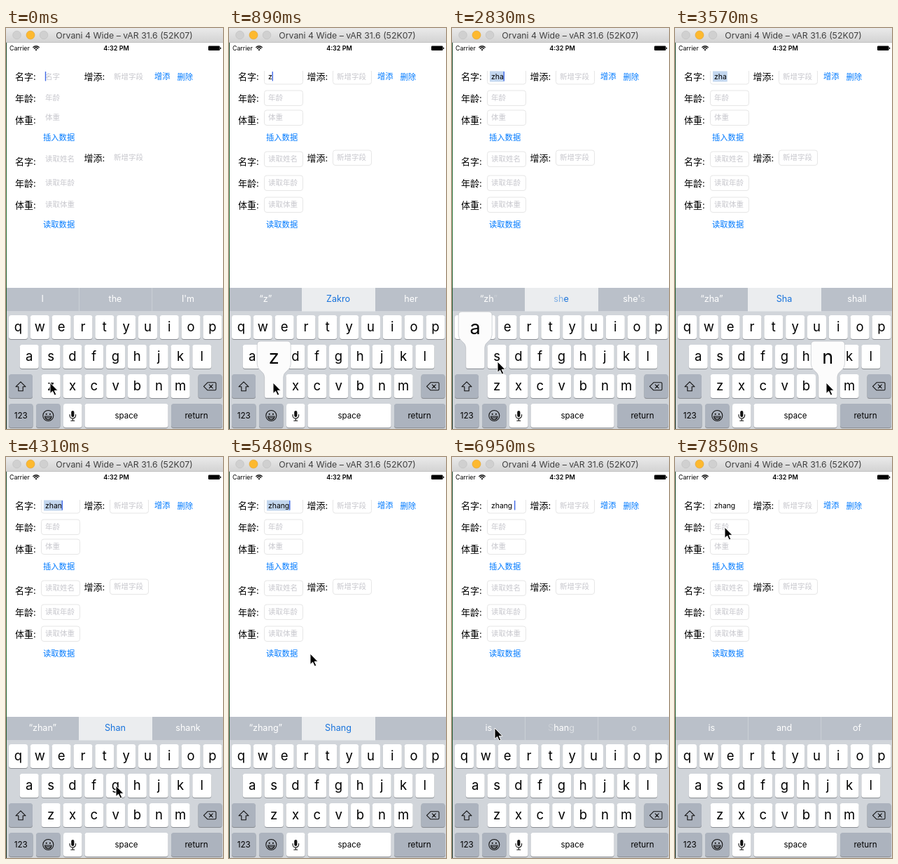
An HTML page for the animation above (7.99 s loop, 310x571 px).

```html
<!DOCTYPE html>
<html lang="zh-CN">
<head>
<meta charset="utf-8">
<title>Form typing demo</title>
<style>
html, body { margin: 0; width: 100%; height: 100%; overflow: hidden; background: #fff; }
svg { display: block; width: 100vw; height: 100vh; }
text { font-family: Inter, "Noto Sans CJK SC", "Noto Sans CJK JP", "Noto Sans CJK", sans-serif; white-space: pre; }
.icon { fill: none; stroke: #111; stroke-width: 1.1; stroke-linejoin: round; stroke-linecap: round; }
</style>
</head>
<body>
<svg id="stage" viewBox="0 0 310 571">
  <defs>
    <linearGradient id="titleBar" x2="0" y2="1"><stop stop-color="#eaeaea"/><stop offset="1" stop-color="#d3d3d3"/></linearGradient>
    <linearGradient id="edge" x2="0" y2="1"><stop stop-color="#1d4a2c"/><stop offset=".45" stop-color="#2f7a3c"/><stop offset="1" stop-color="#16301f"/></linearGradient>
    <clipPath id="belowTop"><rect y="61" width="310" height="300"/></clipPath>
  </defs>
  <g id="fixed"></g>
  <g id="live"></g>
</svg>
<script>
const LOOP = 7990, STEP = 148;
const BLUE = '#007aff', HINT = '#c7c7cd', GREY_KEY = '#acb3be';
const TYPE_SIZE = 10.4;

const rect = (x, y, w, h, fill, r = 0, more = '') =>
  `<rect x="${x}" y="${y}" width="${w}" height="${h}" rx="${r}" fill="${fill}" ${more}/>`;
const text = (s, x, y, size, fill = '#000', more = '') =>
  `<text x="${x}" y="${y}" font-size="${size}" fill="${fill}" ${more}>${s}</text>`;
const circle = (x, y, r, fill, more = '') =>
  `<circle cx="${x}" cy="${y}" r="${r}" fill="${fill}" ${more}/>`;
const icon = (d, more = '') => `<path class="icon" d="${d}" ${more}/>`;
const MID = 'text-anchor="middle"';

// Window and status bar
function drawChrome() {
  return rect(0, 0, 310, 571, '#fff') + rect(0, 20, 1, 551, 'url(#edge)') +
    rect(0, 0, 310, 20.5, 'url(#titleBar)') + rect(0, 20, 310, .8, '#b9b9b9') +
    circle(15.5, 10, 5.8, '#d0d0d0', 'stroke="#bdbdbd" stroke-width=".6"') +
    circle(35, 10, 6, '#fdb92f', 'stroke="#e0a02c" stroke-width=".6"') +
    circle(54, 10, 5.8, '#d0d0d0', 'stroke="#bdbdbd" stroke-width=".6"') +
    text('Orvani 4 Wide – vAR 31.6 (52K07)', 169, 14.8, 12.3, '#404040', MID) +
    text('Carrier', 5, 32, 8.8) +
    icon('M38.8 27.4a6 6 0 0 1 8.4 0M40.4 29.2a3.8 3.8 0 0 1 5.2 0', 'style="stroke-width:1.4"') +
    '<path d="M41.5 30.7a2.2 2.2 0 0 1 3 0L43 32.4z"/>' +
    text('4:32 PM', 157.5, 32, 9, '#000', MID + ' font-weight="600"') +
    rect(289, 25.5, 16.5, 6.5, '#000', 1.2) + rect(306, 27.5, 1.2, 2.6, '#000', .5);
}

const fields = [
  [50, 58, '名字', 69], [50, 88.5, '年龄', 99.5], [50, 116.5, '体重', 127],
  [50, 175.5, '读取姓名', 186.5], [50, 209.5, '读取年龄', 220], [50, 240.5, '读取体重', 251],
  [148, 58, '新增字段', 69], [148, 173.5, '新增字段', 184.5]
];
const hint = ([x, , label, y]) => text(label, x + 6, y + 3.9, 10.5, HINT);

function drawForm() {
  const labels = [['名字:', 13, 69], ['年龄:', 13, 100], ['体重:', 13, 131], ['名字:', 13, 190],
    ['年龄:', 13, 221], ['体重:', 13, 252], ['增添:', 111.5, 69], ['增添:', 111.5, 185]];
  const buttons = [['增添', 212, 69], ['删除', 244.5, 70], ['插入数据', 53, 156], ['读取数据', 53, 280]];
  return labels.map(([s, x, y]) => text(s, x, y + 4.8, 13)).join('') +
    buttons.map(([s, x, y]) => text(s, x, y + 4.2, 11.3, BLUE)).join('') +
    fields.slice(1).map(hint).join('');
}

// Keyboard
const keys = {};
[['qwertyuiop', 17.5, 409], ['asdfghjkl', 33.2, 451], ['zxcvbnm', 64.2, 493]].forEach(([row, x, y]) =>
  [...row].forEach((c, i) => keys[c] = { x: x + i * 30.83, y }));

const keyCap = (x, y, w, fill = '#fff') =>
  rect(x, y + 1, w, 34, '#898c91', 3.5) + rect(x, y, w, 34, fill, 3.5);

function drawKeyboard() {
  const letters = Object.entries(keys).map(([c, k]) =>
    keyCap(k.x - 13.5, k.y, 27) + text(c, k.x, k.y + 22.8, 18.5, '#000', MID)).join('');
  return rect(1, 403.5, 309, 168, '#d1d5da') + letters +
    keyCap(4, 493, 34, GREY_KEY) + keyCap(274.5, 493, 34, GREY_KEY) +
    keyCap(4, 535, 34.5, GREY_KEY) + keyCap(43, 535, 34.5, GREY_KEY) +
    keyCap(82, 535, 26.5) + keyCap(112.5, 535, 119) + keyCap(236, 535, 73, GREY_KEY) +
    text('123', 21.2, 556.3, 11.7, '#000', MID) + text('space', 172, 555.8, 11.5, '#000', MID) +
    text('return', 272, 555.8, 11.7, '#000', MID) +
    icon('M21 503.8l7 7h-3.8v6h-6.4v-6H14z') +
    icon('M288 504.8h10.5a1.5 1.5 0 0 1 1.5 1.5v8a1.5 1.5 0 0 1-1.5 1.5H288l-5.5-5.5zM290.3 507.8l5 5m0-5l-5 5') +
    circle(60.3, 552, 7.5, 'none', 'stroke="#111" stroke-width="1.1"') +
    circle(57.7, 549.8, 1.1, '#111') + circle(62.9, 549.8, 1.1, '#111') +
    icon('M55.5 553h9.6a4.8 4.6 0 0 1-9.6 0zM56.4 555h7.8') +
    rect(93.2, 545, 4.2, 9, '#111', 2.1) + icon('M91 550.5v1.2a4.3 4.3 0 0 0 8.6 0v-1.2M95.3 556v3.2M92.8 559.3h5');
}

// Timeline, counted in steps
const typed = [[0, ''], [6, 'z'], [10, 'zh'], [18, 'zha'], [26, 'zhan'], [32, 'zhang'], [47, 'zhang ']];
const popups = [['z', 5, 7], ['h', 9, 11], ['a', 16, 20], ['n', 24, 27], ['g', 30, 33]];
const caretOff = [[3, 5], [14, 16], [22, 25], [35, 36], [40, 43], [50, 54]];
// "~" and "^" mark a letter that is half or mostly faded
const suggestions = [
  [0, 'I', 'the', "I'm"], [6, '“z”', 'Zakro', 'her'], [11, '“z~h”', 'Zakr~o^f', '~h er'],
  [12, '“zh”', 'she', "she's"], [19, '“zh^”', '~s~he', "she'~s"], [20, '“zha”', 'Sha', 'shall'],
  [27, '“zhan”', 'Shan', 'shank'], [33, '“zhang”', 'Shan', ''], [35, '“zhang”', 'Shang', ''],
  [47, 'is', '^Shan~g', '~o'], [48, 'is', 'and', 'of']
];
const pointer = [[0, 63, 505], [6, 63, 505], [8, 187, 467], [9, 187, 467], [11, 14, 443], [12, 6, 450],
  [15, 32, 466], [18, 32, 466], [19, 65, 475], [23, 216, 505], [26, 216, 505], [29, 157, 468],
  [32, 157, 468], [33, 155, 437], [37, 116, 280], [41, 68, 408], [44, 61, 386], [47, 61, 386], [53, 71, 100]];

const current = (list, n) => list.filter(entry => entry[0] <= n).pop();
const within = (n, from, to) => n >= from && n < to;
const ruler = document.createElement('canvas').getContext('2d');
function widthOf(s) {
  ruler.font = `${TYPE_SIZE}px Inter, sans-serif`;
  return ruler.measureText(s).width;
}

function drawInput(n) {
  const value = current(typed, n)[1], w = widthOf(value);
  const marked = within(n, 18, 47);
  const off = caretOff.some(([a, b]) => within(n, a, b));
  const fading = caretOff.some(([a]) => n === a - 1);
  const borders = n < 5 ? '' : '<g clip-path="url(#belowTop)">' + fields.map(([x, y]) =>
    rect(x + .5, y + .5, 55, 21.5, 'none', 3.5, 'stroke="#e6e6e6"')).join('') + '</g>';
  return borders + (marked ? rect(54, 61.5, w + 3, 15, '#c2d6ee') : '') +
    (value ? text(value, 56, 72.6, TYPE_SIZE) : hint(fields[0])) +
    rect(55.8 + w, 62, 1.4, 13.5, '#3f68e6', .5, `opacity="${off ? 0 : fading ? .5 : 1}"`);
}

function drawSuggestions(n) {
  const [, ...words] = current(suggestions, n);
  const active = within(n, 6, 47);
  const fade = s => s.replace(/([~^])(.)/g, (_, mark, c) =>
    `<tspan fill-opacity="${mark === '~' ? .5 : .22}">${c}</tspan>`);
  return rect(1, 370, 309, 33.5, '#bac0c9') +
    (active ? rect(104, 370, 105, 33.5, '#ebedef')
            : rect(104, 370, .8, 33.5, '#d0d4da') + rect(208.3, 370, .8, 33.5, '#d0d4da')) +
    words.map((s, i) => text(fade(s), [52.3, 156, 260][i], 390, 12.6, active && i === 1 ? '#1873dc' : '#fff', MID)).join('');
}

function drawPopup(n) {
  const open = popups.find(([, from, to]) => within(n, from, to));
  if (!open) return '';
  const { x, y } = keys[open[0]];
  return `<path transform="translate(${x} ${y})" fill="#fcfcfc" stroke="#b4b8be" stroke-width=".6"
    d="M-19-47H19q5 0 5 5V-14q0 5-5 9-5.500 4-5.500 9V31q0 3-3 3H-10.500q-3 0-3-3V4q0-5-5.500-9-5-4-5-9V-42q0-5 5-5z"/>` +
    text(open[0], x, y - 15, 27, '#000', MID);
}

function drawPointer(n) {
  const i = Math.max(1, pointer.findIndex(p => p[0] >= n));
  const [a, b] = n >= 53 ? [pointer.at(-1), pointer.at(-1)] : [pointer[i - 1], pointer[i]];
  const p = b === a ? 0 : (n - a[0]) / (b[0] - a[0]);
  const ease = p * p * (3 - 2 * p);
  const at = k => a[k] + (b[k] - a[k]) * ease;
  return `<path transform="translate(${at(1)} ${at(2)})" stroke="#fff" stroke-width="1"
    d="M0 0V15.500L3.600 12.200 6.300 18 8.800 16.900 6.200 11.300H11z"/>`;
}

const live = document.getElementById('live');
document.getElementById('fixed').innerHTML = drawChrome() + drawForm() + drawKeyboard();

let shown = -1;
function render() {
  const n = Math.min(53, Math.floor((performance.now() % LOOP + 8) / STEP));
  if (n !== shown) {
    live.innerHTML = drawInput(n) + drawSuggestions(n) + drawPopup(n) + drawPointer(n);
    shown = n;
  }
  requestAnimationFrame(render);
}
render();
</script>
</body>
</html>
```
